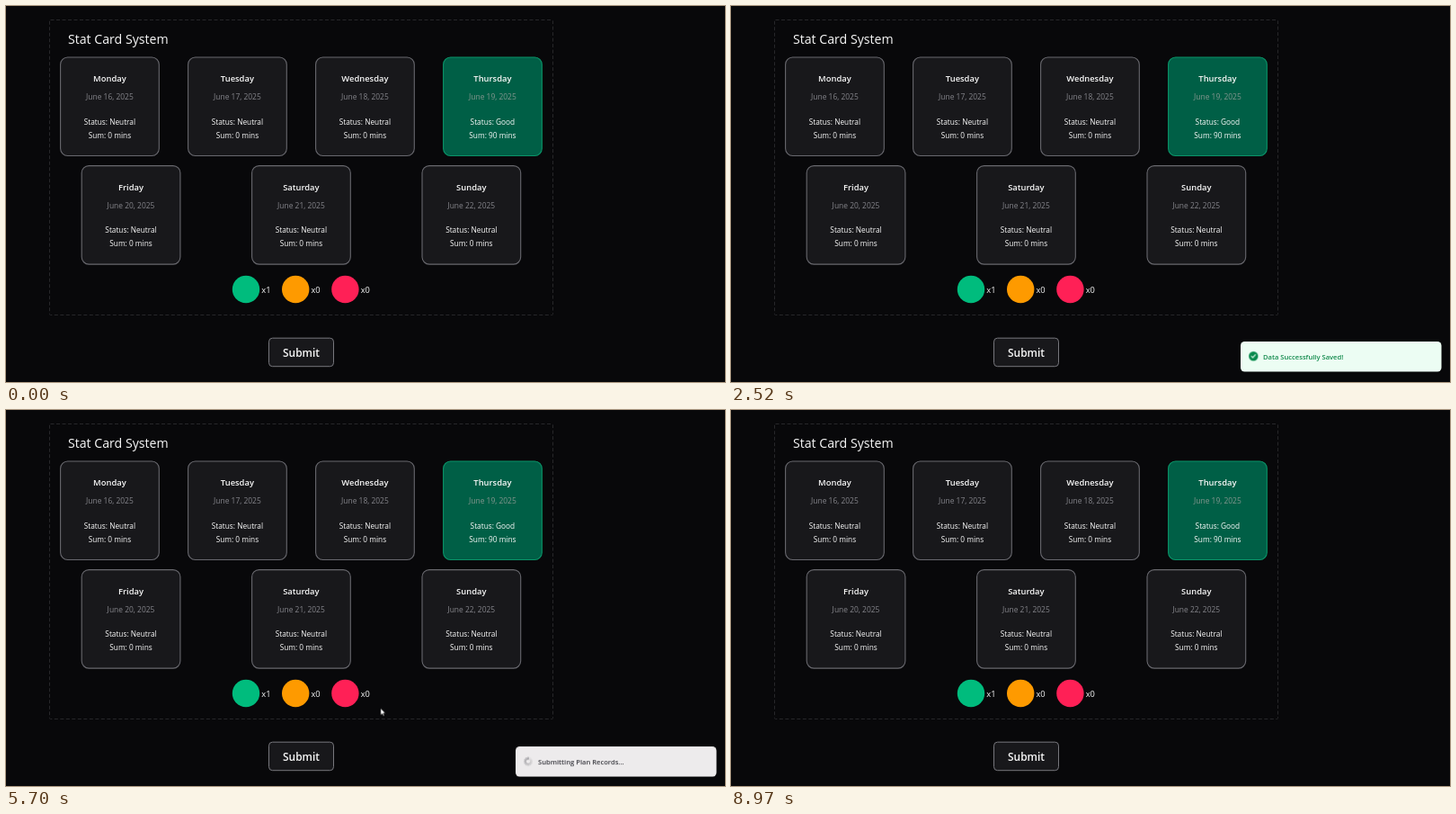
An HTML page for the animation above (9.12 s loop, 800 px wide and 418 px high).

```html
<!DOCTYPE html>
<html lang="en">
<head>
<meta charset="utf-8">
<title>Stat Card System</title>
<style>
  html, body { margin: 0; height: 100%; overflow: hidden; background: #08080a; }
  svg { display: block; width: 100%; height: 100%; font-family: "Open Sans", "Noto Sans", sans-serif; }
  text { fill: #fafafa; }
  .title { font-size: 14.15px; }
  .card rect { fill: #18181b; stroke: #68686e; stroke-width: 1.1; }
  .card.good rect { fill: #005f46; stroke: #0a9468; }
  .card text { font-size: 8.3px; text-anchor: middle; }
  .card .day { font-size: 9.4px; font-weight: 600; }
  .card .date { font-size: 8.45px; fill: #85858b; }
  .card.good .date { fill: #84968f; }
  .tally { font-size: 9.3px; }
  .submit { font-size: 11.9px; font-weight: 600; text-anchor: middle; }
  .toast text { font-size: 7.6px; font-weight: 600; }

  /* One shared 9120 ms timeline: 1% = 91.2 ms */
  .button, .gate, .slide, .load, .ok, .err, .pop, .cursor { animation: 9120ms linear infinite; }
  .button { fill: #18181b; stroke: #77777d; animation-name: hover; }
  .gate { animation-name: gate; animation-timing-function: step-end; }
  .slide { animation-name: slide; animation-timing-function: ease; }
  .load { animation-name: load; animation-timing-function: step-end; }
  .ok { animation-name: ok; animation-timing-function: step-end; }
  .err { animation-name: err; animation-timing-function: step-end; }
  .pop { animation-name: pop; animation-timing-function: ease; }
  .cursor { animation-name: move; animation-timing-function: ease-in-out; }
  .bar { stroke: #55555b; stroke-width: .75; stroke-linecap: round; animation: spin 1140ms linear infinite; }

  @keyframes hover {
    0%, 54.4% { fill: #18181b; }
    55.8%, 60.9% { fill: #3f3f46; }
    62.5%, 100% { fill: #18181b; }
  }
  @keyframes gate {
    0% { opacity: 0; }
    4.6% { opacity: 1; }
    43.75% { opacity: 0; }
    59.1% { opacity: 1; }
    98.25%, 100% { opacity: 0; }
  }
  @keyframes slide {
    0%, 4.6% { transform: translateY(34px); opacity: 0; }
    9%, 41.56% { transform: none; opacity: 1; }
    45.94%, 59.1% { transform: translateY(34px); opacity: 0; }
    63.5%, 96.05% { transform: none; opacity: 1; }
    100% { transform: translateY(34px); opacity: 0; }
  }
  @keyframes load {
    0% { opacity: 1; }
    19.63% { opacity: 0; }
    59.1% { opacity: 1; }
    74.12%, 100% { opacity: 0; }
  }
  @keyframes ok {
    0% { opacity: 0; }
    19.63% { opacity: 1; }
    50%, 100% { opacity: 0; }
  }
  @keyframes err {
    0% { opacity: 0; }
    74.12%, 100% { opacity: 1; }
  }
  @keyframes pop {
    0%, 19.63% { transform: scale(.8); opacity: 0; }
    22.9%, 50% { transform: none; opacity: 1; }
    51%, 74.12% { transform: scale(.8); opacity: 0; }
    76.7%, 100% { transform: none; opacity: 1; }
  }
  @keyframes spin {
    from { opacity: 1; }
    to { opacity: .15; }
  }
  @keyframes move {
    0%, 40.8% { transform: translate(460px, 420px); animation-timing-function: linear; }
    42.21% { transform: translate(460.5px, 407px); animation-timing-function: ease-out; }
    47.1% { transform: translate(445px, 398px); animation-timing-function: ease-in; }
    52.2% { transform: translate(400px, 391px); animation-timing-function: ease-out; }
    55.8%, 60.1% { transform: translate(339px, 380px); }
    68%, 84.4% { transform: translate(739.8px, 130.5px); }
    93.2%, 100% { transform: translate(730px, 420px); }
  }
</style>
</head>
<body>
<svg viewBox="0 0 800 418">
  <rect x="48.5" y="15.5" width="560" height="328" rx="1" fill="none" stroke="#27272a" stroke-dasharray="4 2.5"/>
  <text class="title" x="69" y="42.4">Stat Card System</text>
  <g id="cards"></g>
  <g id="tallies"></g>

  <rect class="button" x="292.5" y="369.2" width="72" height="31.5" rx="4"/>
  <text class="submit" x="328.5" y="390.2">Submit</text>

  <g class="toast gate"><g class="slide">
    <g class="load">
      <rect x="567" y="373" width="223.5" height="33.5" rx="4.5" fill="#f5f3f4"/>
      <g id="spinner" transform="translate(581 389.6)"></g>
      <text x="592" y="392.6" style="fill:#3f3f46">Submitting Plan Records...</text>
    </g>
    <g class="ok">
      <rect x="567" y="373" width="223.5" height="33.5" rx="4.5" fill="#ecfdf3"/>
      <g transform="translate(581.3 389.3)"><g class="pop">
        <circle r="5.2" fill="#078a4c"/>
        <path d="M-2.2 .1-.7 1.6 2.2-1.6" fill="none" stroke="#ecfdf3" stroke-width="1.1" stroke-linecap="round" stroke-linejoin="round"/>
      </g></g>
      <text x="592" y="392.6" style="fill:#118a4c">Data Successfully Saved!</text>
    </g>
    <g class="err">
      <rect x="567" y="373" width="223.5" height="33.5" rx="4.5" fill="#fdeeee"/>
      <g transform="translate(581.3 389.3)"><g class="pop">
        <circle r="5.2" fill="#d9142f"/>
        <path d="M0-2.6V.3M0 2.3v.1" stroke="#fdeeee" stroke-width="1.1" stroke-linecap="round"/>
      </g></g>
      <text x="592" y="392.6" style="fill:#cb1730">Error: There Was An Unexpected Issue!</text>
    </g>
  </g></g>

  <path class="cursor" d="M0 0V7.6L1.8 5.9 3 8.6 4.2 8.1 3 5.5H5.4Z" fill="#fff" stroke="#000" stroke-width=".5"/>
</svg>
<script>
  const put = (id, html) => { document.getElementById(id).innerHTML = html; };

  const days = ["Monday", "Tuesday", "Wednesday", "Thursday", "Friday", "Saturday", "Sunday"];
  const card = (day, i) => {
    const x = i < 4 ? 60.6 + 142 * i : 84.2 + 189.4 * (i - 4);
    const y = i < 4 ? 57 : 177.6;
    const good = day === "Thursday";
    return `<g class="card${good ? " good" : ""}" transform="translate(${x} ${y})">
      <rect width="109.7" height="109.5" rx="8"/>
      <text class="day" x="54.8" y="27">${day}</text>
      <text class="date" x="54.8" y="47.2">June ${16 + i}, 2025</text>
      <text x="54.8" y="74.6">Status: ${good ? "Good" : "Neutral"}</text>
      <text x="54.8" y="89.8">Sum: ${good ? 90 : 0} mins</text>
    </g>`;
  };
  put("cards", days.map(card).join(""));

  const tally = (color, i) => `<circle cx="${267 + 55.2 * i}" cy="315" r="15.2" fill="${color}"/>
    <text class="tally" x="${284.3 + 55.2 * i}" y="318.8">x${i ? 0 : 1}</text>`;
  put("tallies", ["#00bc7d", "#fe9a00", "#ff2056"].map(tally).join(""));

  const bar = (_, i) => `<path class="bar" d="M0-2.5V-4.4" transform="rotate(${30 * i})"
    style="animation-delay:${95 * (i - 12)}ms"/>`;
  put("spinner", Array.from({ length: 12 }, bar).join(""));
</script>
</body>
</html>
```
